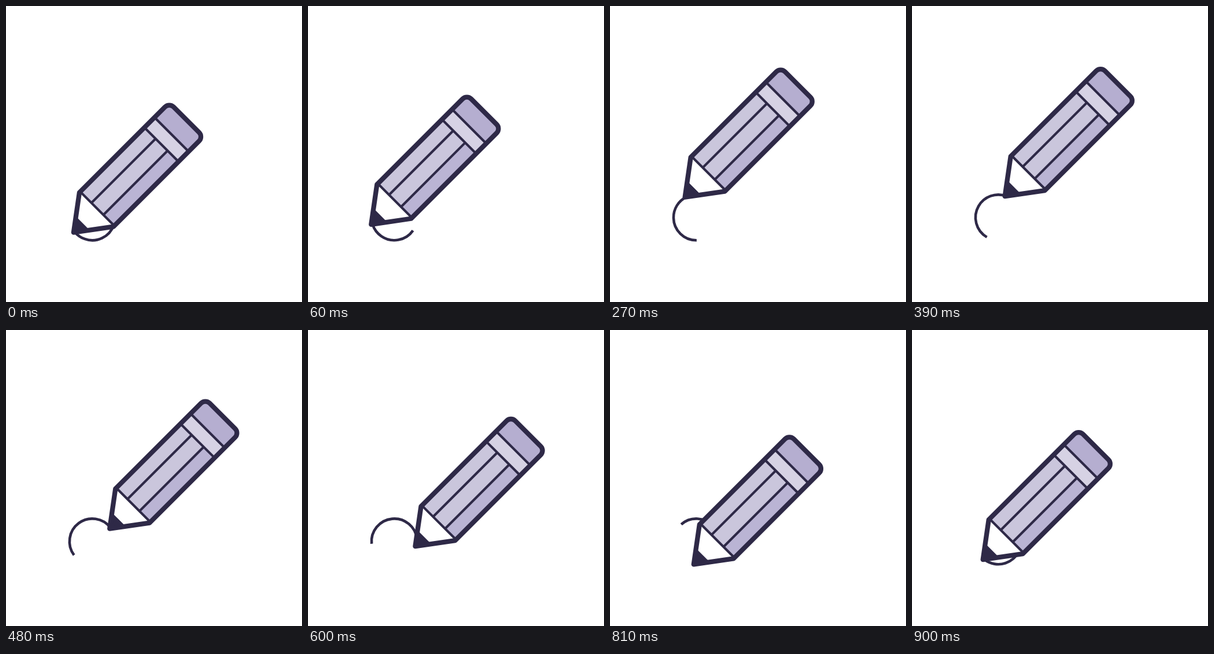
Animation, 512 px wide and 512 px high, one loop 0.93 s. Source, as an HTML page with a canvas:

```html
<!DOCTYPE html>
<html lang="en">
<head>
<meta charset="utf-8">
<title>Pencil drawing a circle</title>
<style>
  html, body { margin: 0; width: 100%; height: 100%; overflow: hidden; background: #fff; }
  canvas { display: block; width: 512px; height: 512px; }
</style>
</head>
<body>
<canvas id="stage" width="512" height="512"></canvas>
<script>
const ctx = document.getElementById('stage').getContext('2d');
const LOOP = 930, STEP = 30;
const INK = '#2e2947';
const RADIUS = 39.4;
const rad = deg => deg * Math.PI / 180;

// Pencil measures: x runs from the tip to the eraser, y across the body.
const HALF = 41.7, LEAD = 22.6, SHOULDER = 55.9, BASE = 58;
const FERRULE = 215, ERASER = 239.7, END = 275.8;
const UPPER = -14.3, LOWER = 15;

function outline() {
  ctx.beginPath();
  ctx.moveTo(0, 0);
  ctx.lineTo(SHOULDER, -HALF);
  ctx.arcTo(END, -HALF, END, HALF, 10.6);
  ctx.arcTo(END, HALF, SHOULDER, HALF, 10.6);
  ctx.lineTo(SHOULDER, HALF);
  ctx.closePath();
}

function band(x1, x2, y1, y2, color) {
  ctx.fillStyle = color;
  ctx.fillRect(x1, y1, x2 - x1, y2 - y1);
}

function line(x1, y1, x2, y2) {
  ctx.beginPath();
  ctx.moveTo(x1, y1);
  ctx.lineTo(x2, y2);
  ctx.stroke();
}

function drawPencil(x, y) {
  ctx.save();
  ctx.translate(x, y);
  ctx.rotate(-Math.PI / 4);

  ctx.save();
  outline();
  ctx.clip();
  band(0, LEAD, -HALF, HALF, INK);
  band(LEAD, BASE, -HALF, HALF, '#fff');
  band(BASE, FERRULE, -HALF, LOWER, '#cac6dc');
  band(BASE, FERRULE, LOWER, HALF, '#bab4d4');
  band(FERRULE, ERASER, -HALF, HALF, '#d6d2e4');
  band(ERASER, END, -HALF, HALF, '#b5aed0');

  ctx.strokeStyle = INK;
  ctx.lineWidth = 4.2;
  for (const cut of [BASE, FERRULE, ERASER]) line(cut, -HALF, cut, HALF);
  for (const seam of [UPPER, LOWER]) line(BASE, seam, FERRULE, seam);
  ctx.restore();

  outline();
  ctx.lineWidth = 8.3;
  ctx.lineJoin = 'round';
  ctx.strokeStyle = INK;
  ctx.stroke();
  ctx.restore();
}

function draw(progress) {
  const head = rad(139.5 + 360 * progress);
  const tail = rad(19.5 + 240 * progress);

  ctx.fillStyle = '#fff';
  ctx.fillRect(0, 0, 512, 512);

  ctx.beginPath();
  ctx.arc(149.3, 365.8, RADIUS, tail, head);
  ctx.strokeStyle = INK;
  ctx.lineWidth = 4.6;
  ctx.stroke();

  drawPencil(146.9 + RADIUS * Math.cos(head), 366.1 + RADIUS * Math.sin(head));
}

const start = performance.now();
function tick() {
  const time = (performance.now() - start) % LOOP;
  draw(Math.floor(time / STEP) * STEP / LOOP);
  requestAnimationFrame(tick);
}
tick();
</script>
</body>
</html>
```
